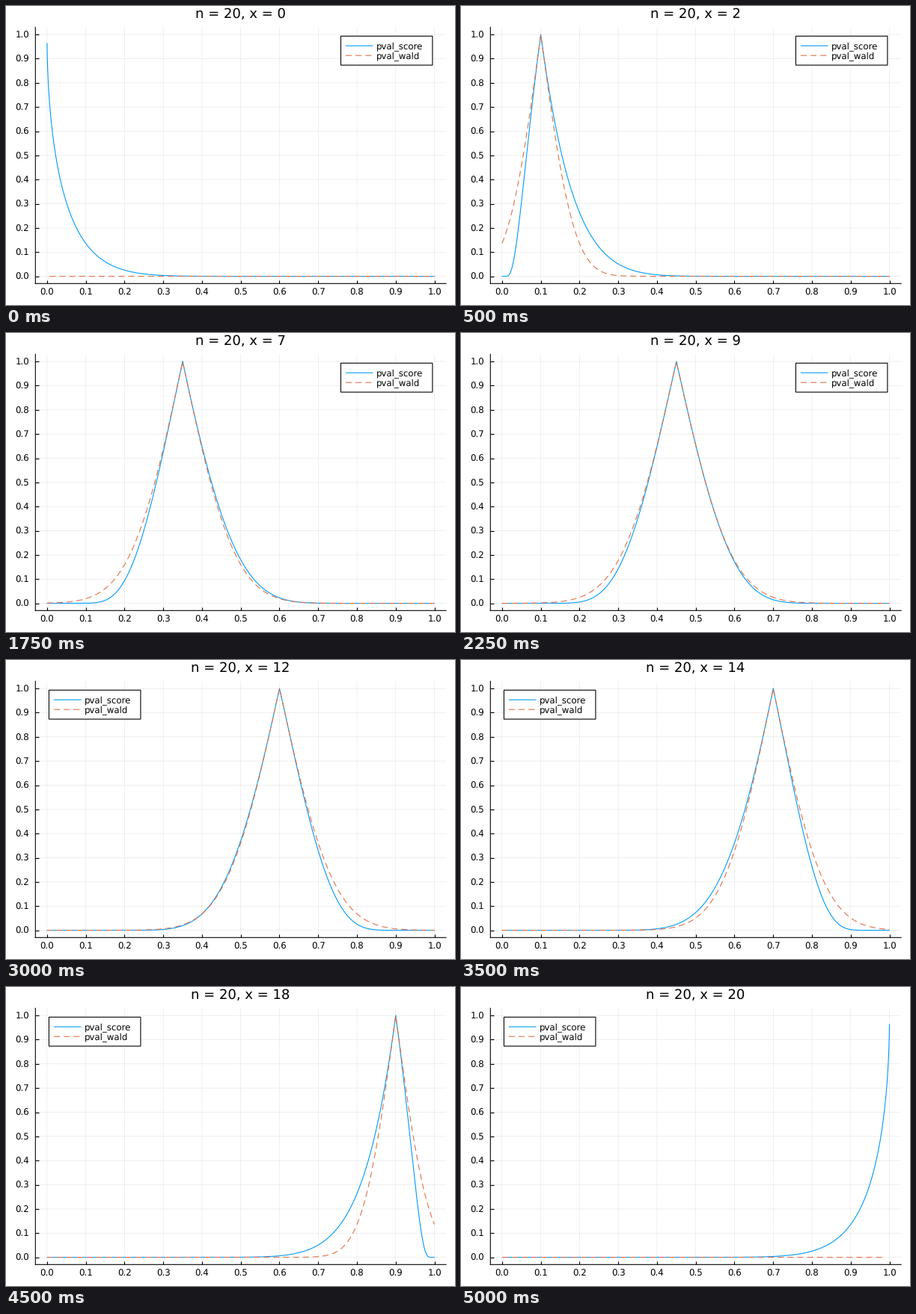
Animation, 600 px wide and 400 px high, one loop 5.25 s. Source, as a matplotlib script:

```python
import math

import matplotlib.pyplot as plt
import numpy as np
from matplotlib.animation import FuncAnimation
from matplotlib.patches import Rectangle

W, H, DPI = 600, 400, 100
N = 20
BLUE, ORANGE = "#009AFA", "#E36F47"
PX = 72 / DPI  # points per pixel

plt.rcParams.update({
    "font.family": "DejaVu Sans",
    "text.hinting": "none",
    "path.snap": False,
    "lines.solid_joinstyle": "round",
    "lines.solid_capstyle": "butt",
    "lines.dash_joinstyle": "round",
    "lines.dash_capstyle": "butt",
})
erfc = np.vectorize(math.erfc, otypes=[float])
p = np.linspace(0, 1, 10001)


def pvalue(diff, se):
    """Two-sided normal p-value."""
    with np.errstate(divide="ignore", invalid="ignore"):
        return erfc(np.abs(diff / se) / math.sqrt(2))


def pval_score(x):
    return pvalue(x / N - p, np.sqrt(p * (1 - p) / N))


def pval_wald(x):
    phat = x / N
    y = pvalue(phat - p, math.sqrt(phat * (1 - phat) / N) * np.ones_like(p))
    if x == 0:
        y[p < 0.0065] = np.nan
    elif x == N:
        y[p > 0.982] = np.nan
    return y


fig = plt.figure(figsize=(W / DPI, H / DPI), dpi=DPI, facecolor="white")

left, right, top, bottom = 39.3, 588.1, 28.4, 371.3
ax = fig.add_axes([left / W, 1 - bottom / H, (right - left) / W, (bottom - top) / H])
ax.set(xlim=(-0.03, 1.03), ylim=(-0.03, 1.03))
ticks = np.arange(11) / 10
labels = [f"{t:.1f}" for t in ticks]
ax.set_xticks(ticks, labels)
ax.set_yticks(ticks, labels)
ax.tick_params(direction="in", length=4.5 * PX, width=1.1 * PX, labelsize=11.8 * PX)
ax.tick_params(axis="x", pad=6.5 * PX)
ax.tick_params(axis="y", pad=8 * PX)
ax.grid(color="black", alpha=0.1, linewidth=0.6 * PX)
ax.set_axisbelow(True)
ax.spines[["top", "right"]].set_visible(False)
ax.spines[["left", "bottom"]].set_linewidth(1.1 * PX)

# Overlay in pixel coordinates for the title and legend
page = fig.add_axes([0, 0, 1, 1])
page.set(xlim=(0, W), ylim=(H, 0))
page.axis("off")

score_style = dict(color=BLUE, lw=1.1 * PX)
wald_style = dict(color=ORANGE, lw=1.1 * PX, dashes=(8.1 / 1.1, 5.05 / 1.1))

score_line, = ax.plot([], [], **score_style)
wald_line, = ax.plot([], [], **wald_style)
title = page.text(313.6, 16, "", ha="center", va="baseline", fontsize=18 * PX)


def make_legend(x0):
    parts = [page.add_patch(Rectangle((x0, 40.3), 122.5, 38.8, fc="white",
                                      ec="black", lw=1.1 * PX))]
    rows = [("pval_score", 53.2, score_style), ("pval_wald", 66.2, wald_style)]
    for name, y, style in rows:
        parts += page.plot([x0 + 6.5, x0 + 43], [y, y], **style)
        parts.append(page.text(x0 + 48, y + 4.4, name, va="baseline",
                               fontsize=11.8 * PX))
    return parts


legend_left, legend_right = make_legend(57.4), make_legend(447.4)


def update(x):
    score_line.set_data(p, pval_score(x))
    wald_line.set_data(p, pval_wald(x))
    title.set_text(f"n = {N}, x = {x}")
    on_left = x >= N // 2
    for part in legend_left:
        part.set_visible(on_left)
    for part in legend_right:
        part.set_visible(not on_left)
    return [score_line, wald_line, title, *legend_left, *legend_right]


anim = FuncAnimation(fig, update, frames=N + 1, interval=250,
                     repeat=True, repeat_delay=0, blit=False)
plt.show()
```
